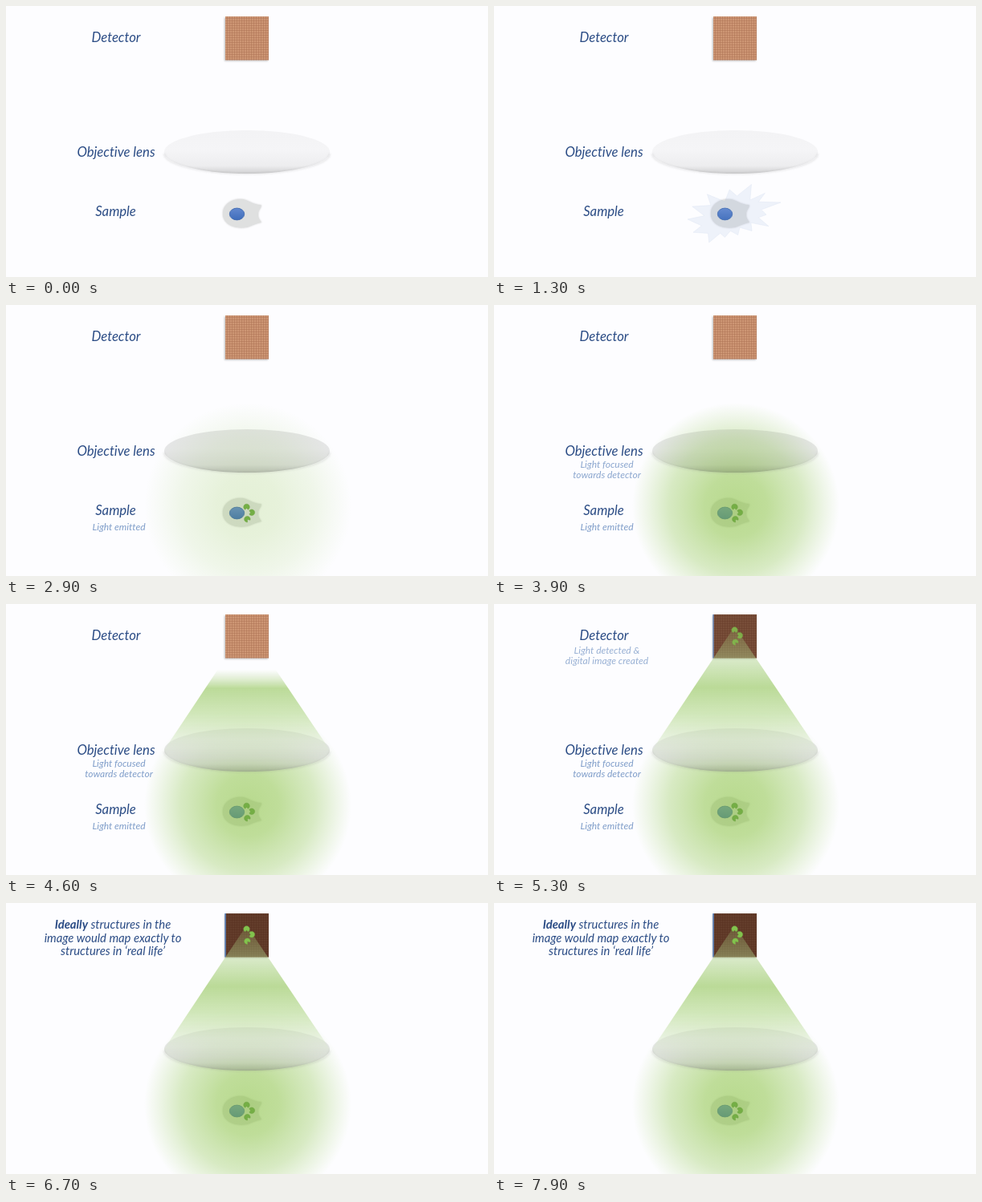
An HTML page that plays this animation: 600x338 px, repeating every 8 s.

```html
<!DOCTYPE html>
<html lang="en">
<head>
<meta charset="utf-8">
<title>Light path</title>
<style>
  html, body { margin: 0; width: 100%; height: 100%; overflow: hidden; background: #fdfdff; }
  svg { display: block; width: 100%; height: 100%; }
  text { font: italic 16.7px Lato, Carlito, sans-serif; font-variant-ligatures: none; fill: #2b4c85; text-anchor: middle; }
  .note text { font-size: 12px; fill: #7f9dc9; }
  #ideal text { font-size: 14.8px; }
  .bold { font-weight: bold; }
</style>
</head>
<body>
<svg viewBox="0 0 600 338">
  <defs>
    <radialGradient id="glowFill" gradientUnits="userSpaceOnUse" cx="301" cy="251" r="129">
      <stop offset="0" stop-color="#86c03c" stop-opacity=".58"/>
      <stop offset=".3" stop-color="#86c03c" stop-opacity=".52"/>
      <stop offset=".65" stop-color="#88c244" stop-opacity=".32"/>
      <stop offset=".88" stop-color="#8cc44c" stop-opacity=".11"/>
      <stop offset="1" stop-color="#8cc44c" stop-opacity="0"/>
    </radialGradient>
    <linearGradient id="beamFill" gradientUnits="userSpaceOnUse" x1="0" y1="28" x2="0" y2="209">
      <stop offset="0" stop-color="#a5d07a" stop-opacity=".18"/>
      <stop offset=".2" stop-color="#b2d58e" stop-opacity=".42"/>
      <stop offset=".42" stop-color="#b7d892" stop-opacity=".95"/>
      <stop offset=".6" stop-color="#cbe4b1" stop-opacity=".9"/>
      <stop offset=".78" stop-color="#e4efda" stop-opacity=".8"/>
      <stop offset=".9" stop-color="#e6eae3" stop-opacity=".6"/>
      <stop offset="1" stop-color="#e6eae3" stop-opacity=".3"/>
    </linearGradient>
    <linearGradient id="lensFill" x1="0" y1="0" x2="0" y2="1">
      <stop offset="0" stop-color="#333" stop-opacity=".05"/>
      <stop offset=".45" stop-color="#333" stop-opacity=".04"/>
      <stop offset=".82" stop-color="#333" stop-opacity=".08"/>
      <stop offset="1" stop-color="#333" stop-opacity=".22"/>
    </linearGradient>
    <linearGradient id="wipe" gradientUnits="userSpaceOnUse" x1="0" x2="0" y1="182" y2="206">
      <stop offset="0" stop-color="#000"/>
      <stop offset="1" stop-color="#fff"/>
    </linearGradient>
    <linearGradient id="nucleus" x1="0" y1="0" x2="0" y2="1">
      <stop offset="0" stop-color="#6288cf"/>
      <stop offset="1" stop-color="#3f6dbb"/>
    </linearGradient>
    <mask id="wipeMask" maskUnits="userSpaceOnUse" x="0" y="0" width="600" height="338">
      <rect width="600" height="338" fill="url(#wipe)"/>
    </mask>
    <pattern id="grid" patternUnits="userSpaceOnUse" x="273" y="13" width="3" height="3">
      <path d="M0 2.5H3M2.5 0V3" stroke="#a96f50" stroke-opacity=".55" stroke-width=".8"/>
    </pattern>
    <filter id="soft" x="-20%" y="-20%" width="140%" height="140%"><feGaussianBlur stdDeviation="1.2"/></filter>
    <path id="cellShape" d="M270 259C270 248 280 241 292 241C301 241 306 248 318 248.5C317 253 313 256 314 260C313 264 316 267 318 270C308 271 304 277 292 276.5C280 276 270 270 270 259Z"/>
    <g id="dots" fill="#74ae45" stroke="#689c3d" stroke-width=".4">
      <path d="M299.5 253.5L301.5 255.2A3.8 3.8 0 1 0 297.5 255.2Z"/>
      <path d="M304.5 259L302.8 261A3.8 3.8 0 1 0 302.8 256.5Z"/>
      <path d="M300.5 267.5L304 268.3A3.8 3.8 0 1 0 300.5 271Z"/>
    </g>
  </defs>

  <rect width="600" height="338" fill="#fdfdff"/>

  <rect x="272" y="14.5" width="54" height="54" fill="#555" opacity=".4" filter="url(#soft)"/>
  <rect x="273" y="13" width="54" height="54.5" fill="#cd9674"/>
  <rect x="273" y="13" width="54" height="54.5" fill="url(#grid)"/>
  <g id="dark">
    <rect x="273" y="13" width="54" height="54.5" fill="#2b0f06" opacity=".65"/>
    <path d="M273 13V67.5" stroke="#5b82bb" stroke-width="1.6"/>
  </g>

  <use href="#cellShape" fill="#888" opacity=".45" filter="url(#soft)"/>
  <use href="#cellShape" fill="#dfe0e0"/>
  <ellipse cx="287.5" cy="259.5" rx="9.2" ry="7.4" fill="url(#nucleus)" stroke="#3c66ad" stroke-width=".8"/>
  <path id="star" fill="#7f9fd8" fill-opacity=".58" stroke="#6f8fc4" stroke-opacity=".6" stroke-width=".8"/>

  <ellipse id="shade" cx="300" cy="182" rx="103" ry="27" fill="#444"/>
  <circle id="glow" cx="301" cy="251" r="129" fill="url(#glowFill)"/>
  <use id="organs" href="#dots"/>
  <g mask="url(#wipeMask)">
    <path d="M299.5 28L403 182A103 27 0 0 1 197 182Z" fill="url(#beamFill)"/>
  </g>
  <ellipse cx="300" cy="182" rx="103.2" ry="27" fill="url(#lensFill)"/>
  <path d="M197 184A103 25 0 0 0 403 184" fill="none" stroke="#777" stroke-opacity=".25" stroke-width="1.4" filter="url(#soft)"/>
  <g id="image"><use href="#dots" y="-219.5" style="filter:brightness(1.12)"/></g>

  <g id="labels">
    <text x="137" y="45">Detector</text>
    <text x="137" y="188">Objective lens</text>
    <text x="136.5" y="261.5">Sample</text>
    <g class="note" id="emitted"><text x="140.5" y="281">Light emitted</text></g>
    <g class="note" id="focused">
      <text x="140.5" y="202.5">Light focused</text>
      <text x="140.5" y="216">towards detector</text>
    </g>
    <g class="note" id="detected">
      <text x="140.5" y="61.5">Light detected &amp;</text>
      <text x="140.5" y="75">digital image created</text>
    </g>
  </g>
  <g id="ideal">
    <text x="133" y="32"><tspan class="bold">Ideally</tspan> structures in the</text>
    <text x="133" y="48.5">image would map exactly to</text>
    <text x="133" y="64.5">structures in ‘real life’</text>
  </g>
</svg>
<script>
const el = id => document.getElementById(id);
const ramp = (t, from, to) => Math.min(1, Math.max(0, (t - from) / (to - from)));
const show = (id, alpha) => el(id).setAttribute('opacity', alpha);

// burst outline in percent of its box
const burst = [[53, 20], [68.5, 0], [67, 27], [83, 15], [76, 30], [100, 31], [79, 43.5], [84.5, 52],
  [76, 57], [87, 72], [68, 66], [69, 80], [56, 74], [54, 87], [46, 80], [40, 91], [35, 84], [23, 100],
  [22, 84], [6, 82.5], [15, 71], [0, 60], [18, 54], [5, 38], [25, 36], [21, 17], [40, 29.5], [45, 9]];
el('star').setAttribute('d', 'M' + burst.map(([x, y]) => [241 + x * 1.16, 222.5 + y * .725]).join('L') + 'Z');

function draw(t) {
  const beam = ramp(t, 4290, 4790);
  const detect = ramp(t, 4900, 5400);
  const swap = ramp(t, 6130, 6630);

  show('star', ramp(t, 1200, 1700) - ramp(t, 2000, 2500));
  show('organs', ramp(t, 2300, 2800));
  show('glow', ramp(t, 2720, 3220));
  show('shade', .08 * ramp(t, 2500, 2900));
  show('emitted', ramp(t, 2400, 2900));
  show('focused', ramp(t, 3450, 3950));
  show('dark', detect);
  show('image', detect);
  show('detected', detect);
  show('labels', 1 - swap);
  show('ideal', swap);

  const edge = 209 - 205 * beam;
  el('wipe').setAttribute('y1', edge);
  el('wipe').setAttribute('y2', edge + 24);
}

function tick() {
  draw(performance.now() % 8000);
  requestAnimationFrame(tick);
}
tick();
</script>
</body>
</html>
```
